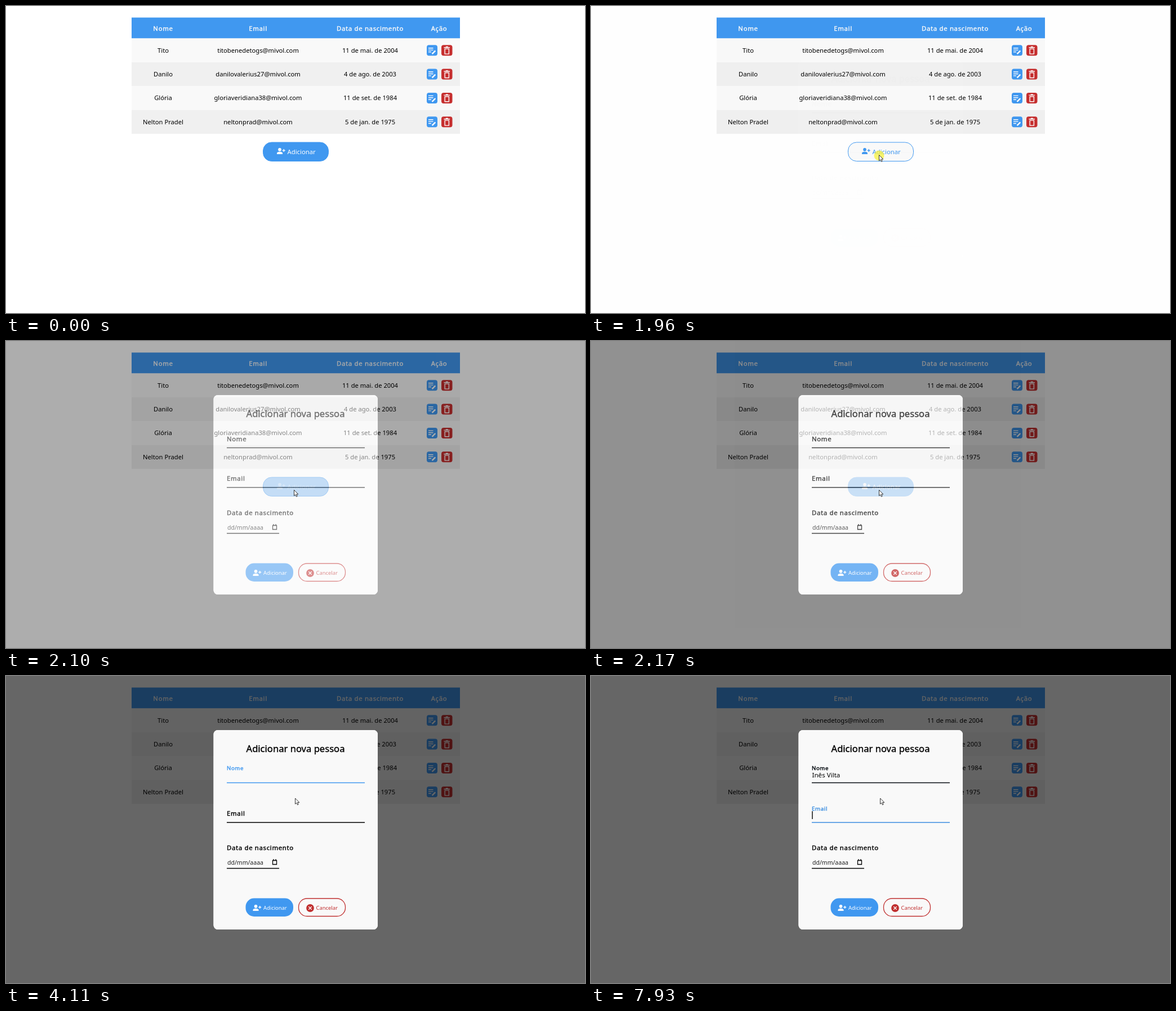
Write an HTML page that moves like this. It is 1028x545 px and loops after 8000 ms.

```html
<!DOCTYPE html>
<html lang="pt-BR">
<head>
<meta charset="utf-8">
<title>Pessoas</title>
<style>
  :root { --blue: #4098f0; --paper: #f9f9f9; }
  html, body { margin: 0; width: 100%; height: 100%; overflow: hidden; background: #fff; }
  svg { display: block; width: 1028px; height: 545px; font: 11.2px "Noto Sans", sans-serif; }
  text { white-space: pre; }
  .mid { text-anchor: middle; }
  .label { font-size: 11.4px; letter-spacing: .058em; fill: currentColor; stroke: currentColor; stroke-width: .4; }
  .small { font-size: 9.4px; }
  .line { fill: none; stroke: currentColor; stroke-width: 1.3; }
</style>
</head>
<body>
<svg viewBox="0 0 1028 545">
  <defs>
    <g id="person" fill="currentColor">
      <circle cx="5" cy="2.9" r="2.8"/>
      <path d="M0 11V9.4Q0 6.8 5 6.8T10 9.4V11Z"/>
      <path class="line" d="M12.2 2v5M9.7 4.5h5"/>
    </g>
    <g id="actions" fill="none" stroke="#fff" stroke-width="1.4">
      <rect x="747" y="-9.5" width="19" height="19" rx="4" fill="var(--blue)" stroke="none"/>
      <path d="M750-4h8.5M750-.6h8.5M750 2.8h5"/>
      <path d="M756.5 6.4l5.8-5.8" stroke-width="2.4"/>
      <rect x="773" y="-9.5" width="19.5" height="19" rx="4" fill="#c62f2f" stroke="none"/>
      <path d="M777.5-5h10.5M780.8-6.2h4M779.2-2.6h7.2v9h-7.2z"/>
    </g>
  </defs>

  <g id="table"><rect x="223" y="20.5" width="583" height="37" fill="var(--blue)"/></g>

  <g id="addButton">
    <rect x="456.5" y="242" width="116" height="33.5" rx="15" stroke="var(--blue)"/>
    <use href="#person" x="481" y="252"/>
    <text x="499.5" y="263" font-size="11.3" fill="currentColor">Adicionar</text>
  </g>

  <g id="modal">
    <path d="M0 0H1028V545H0ZM376 96H652.5a7.5 7.5 0 0 1 7.5 7.5V442.5a7.5 7.5 0 0 1-7.5 7.5H376a7.5 7.5 0 0 1-7.5-7.5V103.5a7.5 7.5 0 0 1 7.5-7.5Z" fill-rule="evenodd" fill-opacity=".6"/>
    <rect x="368.5" y="96" width="291.5" height="354" rx="7.5" fill="var(--paper)"/>
    <text class="mid" x="514" y="135" font-size="16.6" stroke="#000" stroke-width=".35">Adicionar nova pessoa</text>
    <g id="fields"></g>
    <text id="typed" x="392.5" y="180" font-size="11.6"></text>
    <rect id="caret" width="1.4" height="14"/>
    <text class="label" x="392" y="309">Data de nascimento</text>
    <text x="393" y="334.5" font-size="10.5" fill="#222">dd/mm/aaaa</text>
    <path class="line" d="M392 341.5h93"/>
    <path class="line" d="M473.5 327.5h7v7h-7zM473 327.3h8M475 325v2M479 325v2" stroke-width="1"/>
    <g color="#fff">
      <rect x="425.5" y="394.5" width="84.5" height="32.5" rx="15" fill="var(--blue)"/>
      <use href="#person" x="438.5" y="406"/>
      <text class="small" x="457" y="415" fill="#fff">Adicionar</text>
    </g>
    <g color="#c03030" fill="currentColor">
      <rect class="line" x="519.5" y="395" width="83" height="31.5" rx="15"/>
      <circle cx="540" cy="412" r="6.9"/>
      <path class="line" d="M537.3 409.3l5.4 5.4m0-5.4l-5.4 5.4" color="#fff"/>
      <text class="small" x="550.5" y="415">Cancelar</text>
    </g>
  </g>

  <g id="pointer">
    <circle id="click" cx="0" cy="1" r="9" fill="#f6f03c" fill-opacity=".75"/>
    <path d="M0 0V10.3L2.3 8.2 4 11.8 5.7 11 4.1 7.5H7.3Z" fill="#fff" stroke="#222" stroke-width=".9"/>
  </g>
</svg>

<script>
const $ = id => document.getElementById(id);
const LOOP = 8000;
const columns = [279, 447.5, 646.5, 769];
const people = [
  ['Tito', 'titobenedetogs@mivol.com', '11 de mai. de 2004'],
  ['Danilo', 'danilovalerius27@mivol.com', '4 de ago. de 2003'],
  ['Glória', 'gloriaveridiana38@mivol.com', '11 de set. de 1984'],
  ['Nelton Pradel', 'neltonprad@mivol.com', '5 de jan. de 1975']
];
const newName = 'Inês Vilta';
const keyTimes = [4730, 4930, 5190, 5590, 6250, 6650, 6850, 6980, 7400, 7530];
const focusName = 3580, focusEmail = 7790;

// Pointer stops: time, x, y
const pointerPath = [
  [370, 934, 535], [640, 700, 400], [880, 550, 312], [1140, 493, 283],
  [1340, 502, 271], [1610, 511.5, 264.5], [2310, 511.5, 264.5], [2580, 497, 238],
  [2780, 496.5, 206], [2910, 496.5, 197], [3110, 497, 232], [3380, 513.5, 217]
];

const cells = (texts, y, cls) => texts.map((text, i) =>
  `<text class="mid ${cls}" x="${columns[i]}" y="${y}">${text}</text>`).join('');

const headings = cells(['Nome', 'Email', 'Data de nascimento', 'Ação'], 43.5, 'label');
$('table').innerHTML += `<g color="#f9f9f9">${headings}</g>` + people.map((person, i) => {
  const top = 57.5 + i * 42.35;
  return `<rect x="223" y="${top}" width="583" height="42.35" fill="${i % 2 ? '#f0f0f0' : '#f9f9f9'}"/>`
    + cells(person, top + 25.2, '') + `<use href="#actions" y="${top + 21.2}"/>`;
}).join('');

const fields = [['Nome', 177.5, 166.5, 189.5], ['Email', 248, 238, 260]].map(([name, low, high, lineY]) => {
  const group = document.createElementNS('http://www.w3.org/2000/svg', 'g');
  group.innerHTML = `<text class="label" x="392">${name}</text><path class="line" d="M392 ${lineY}h245"/>`;
  $('fields').append(group);
  return { group, label: group.firstChild, low, high };
});

const mix = (a, b, p) => a + (b - a) * p;
const progress = (t, start, duration) => Math.min(1, Math.max(0, (t - start) / duration));
const ease = (t, start, duration) => 1 - (1 - progress(t, start, duration)) ** 2.2;
const blend = (from, to, p) => `color-mix(in srgb, ${to} ${p * 100}%, ${from})`;

function pointerAt(t) {
  const next = pointerPath.findIndex(stop => stop[0] > t);
  if (next < 0) return pointerPath.at(-1).slice(1);
  const a = pointerPath[Math.max(0, next - 1)], b = pointerPath[next];
  const p = progress(t, a[0], b[0] - a[0] || 1);
  return [mix(a[1], b[1], p), mix(a[2], b[2], p)];
}

function drawField({ group, label, low, high }, lift, focus) {
  group.style.color = blend('#000', 'var(--blue)', focus);
  label.style.fontSize = mix(11.4, 9.7, lift) + 'px';
  label.setAttribute('y', mix(low, high, lift));
}

function draw(t) {
  const [x, y] = pointerAt(t);
  $('pointer').setAttribute('transform', `translate(${x} ${y})`);
  $('pointer').style.display = t < 370 ? 'none' : '';
  $('click').style.display = t >= 1890 && t < 2030 ? '' : 'none';

  const hover = ease(t, 1260, 300) - ease(t, 2030, 200);
  $('addButton').style.color = blend('#fff', 'var(--blue)', hover);
  $('addButton').firstElementChild.style.fill = blend('var(--blue)', 'var(--paper)', hover);

  $('modal').style.opacity = ease(t, 1960, 480);

  const first = ease(t, focusName, 200), second = ease(t, focusEmail, 200);
  drawField(fields[0], first, first - second);
  drawField(fields[1], second, second);

  const typedCount = keyTimes.filter(k => k <= t).length;
  $('typed').textContent = newName.slice(0, typedCount);

  // The caret restarts its blink at each key press
  const inEmail = t >= focusEmail;
  const lastInput = inEmail ? focusEmail : typedCount ? keyTimes[typedCount - 1] : focusName;
  const caretOn = t >= focusName && (t - lastInput) % 1060 < 530;
  $('caret').style.display = caretOn ? '' : 'none';
  $('caret').setAttribute('x', 392.3 + (inEmail || !typedCount ? 0 : $('typed').getComputedTextLength()));
  $('caret').setAttribute('y', inEmail ? 240 : 170);
}

function tick() {
  draw(performance.now() % LOOP);
  requestAnimationFrame(tick);
}
tick();
</script>
</body>
</html>
```
